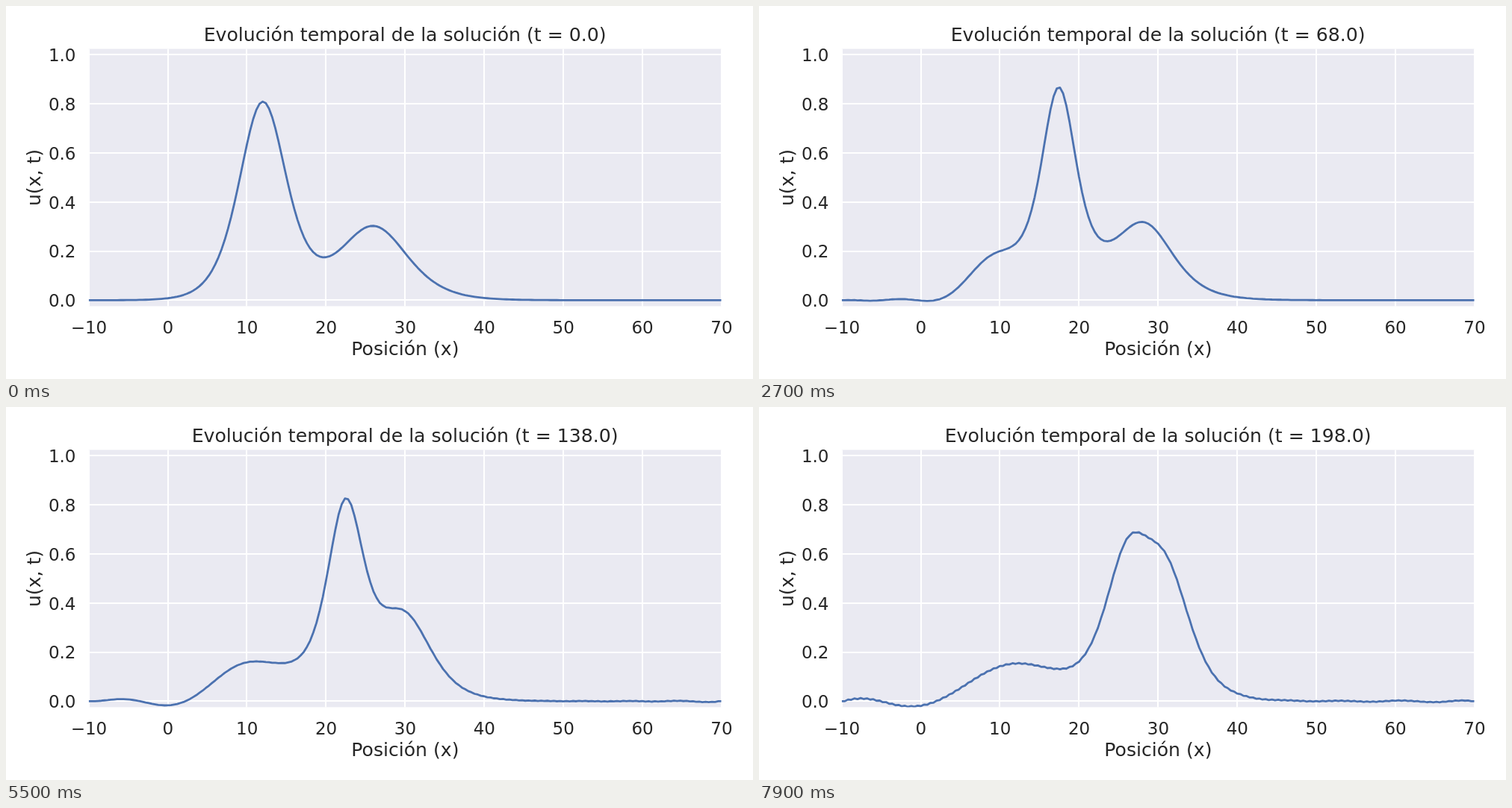
Write an HTML page with a canvas that moves like this. It is 1000 px wide and 500 px high and loops after 8000 ms.

```html
<!DOCTYPE html>
<html lang="es">
<head>
<meta charset="utf-8">
<title>Evolución temporal de la solución</title>
<style>
  html, body { margin: 0; width: 100%; height: 100%; overflow: hidden; background: #fff; }
  canvas { display: block; width: 1000px; height: 500px; }
</style>
</head>
<body>
<canvas id="stage" width="1000" height="500"></canvas>
<script>
const ctx = document.getElementById('stage').getContext('2d');
const FONT = '"DejaVu Sans", sans-serif';
const AXES = { left: 110.7, right: 957.7, top: 57.5, bottom: 402.4 };
const X_MIN = -10, X_MAX = 70;
const LOOP = 8000, STEP = 100, T_PER_STEP = 2.5;

const px = x => AXES.left + (x - X_MIN) / (X_MAX - X_MIN) * (AXES.right - AXES.left);
const py = u => 394.4 - 329 * u;

// Korteweg-de Vries: u_t + EPS u u_x + MU u_xxx = 0, leapfrog in time
const EPS = 0.2, MU = 0.1, DX = 0.4, DT = 0.1, N = 201;
const pulse = (amp, arg) => amp * (1 - Math.tanh(arg) ** 2);
const initial = x => pulse(0.8, x / 4 - 3) + pulse(0.3, 4.5 * x / 26 - 4.5);

function advance(base, u, dt) {
  const next = base.slice();
  for (let i = 2; i < N - 2; i++) {
    const mean = (u[i + 1] + u[i] + u[i - 1]) / 3;
    const slope = (u[i + 1] - u[i - 1]) / (2 * DX);
    const third = (u[i + 2] - 2 * u[i + 1] + 2 * u[i - 1] - u[i - 2]) / (2 * DX ** 3);
    next[i] = base[i] - dt * (EPS * mean * slope + MU * third);
  }
  return next;
}

// One profile per unit of time
function solve(tEnd) {
  const perUnit = Math.round(1 / DT);
  let prev = Float64Array.from({ length: N }, (_, i) => initial(X_MIN + i * DX));
  let cur = advance(prev, prev, DT);
  const out = [prev];
  for (let n = 1; n <= tEnd * perUnit; n++) {
    if (n % perUnit === 0) out.push(cur);
    [prev, cur] = [cur, advance(prev, cur, 2 * DT)];
  }
  return out;
}

const profiles = solve(200);

function label(str, x, y, size, align = 'center') {
  ctx.font = `${size}px ${FONT}`;
  ctx.textAlign = align;
  ctx.fillStyle = '#262626';
  ctx.fillText(str, x, y);
}

function drawAxes() {
  const { left, right, top, bottom } = AXES;
  ctx.fillStyle = '#fff';
  ctx.fillRect(0, 0, 1000, 500);
  ctx.fillStyle = '#eaeaf2';
  ctx.fillRect(left, top, right - left, bottom - top);

  for (let x = X_MIN; x <= X_MAX; x += 10) {
    ctx.fillStyle = '#fff';
    ctx.fillRect(Math.round(px(x)) - 1, top, 2, bottom - top);
    label(String(x).replace('-', '\u2212'), px(x) + 0.2, 439, 23);
  }
  for (let k = 0; k <= 5; k++) {
    const y = py(k / 5);
    ctx.fillStyle = '#fff';
    ctx.fillRect(left, Math.round(y) - 1, right - left, 2);
    label((k / 5).toFixed(1), 93.5, y + 8.7, 23, 'right');
  }

  label('Posición (x)', 534.4, 468, 25.1);
  ctx.save();
  ctx.translate(46, 230);
  ctx.rotate(-Math.PI / 2);
  label('u(x, t)', 0, 0, 25.1);
  ctx.restore();
}

function drawCurve(u) {
  const { left, right, top, bottom } = AXES;
  ctx.save();
  ctx.beginPath();
  ctx.rect(left, top, right - left, bottom - top);
  ctx.clip();
  ctx.beginPath();
  u.forEach((v, i) => ctx.lineTo(px(X_MIN + i * DX), py(v)));
  ctx.strokeStyle = '#4c72b0';
  ctx.lineWidth = 2.8;
  ctx.lineJoin = 'round';
  ctx.stroke();
  ctx.restore();
}

function frame() {
  const step = Math.floor((performance.now() % LOOP) / STEP);
  const t = Math.round(step * T_PER_STEP);
  drawAxes();
  drawCurve(profiles[t]);
  label(`Evolución temporal de la solución (t = ${t.toFixed(1)})`, 534.1, 47, 25.15);
  requestAnimationFrame(frame);
}
frame();
</script>
</body>
</html>
```
